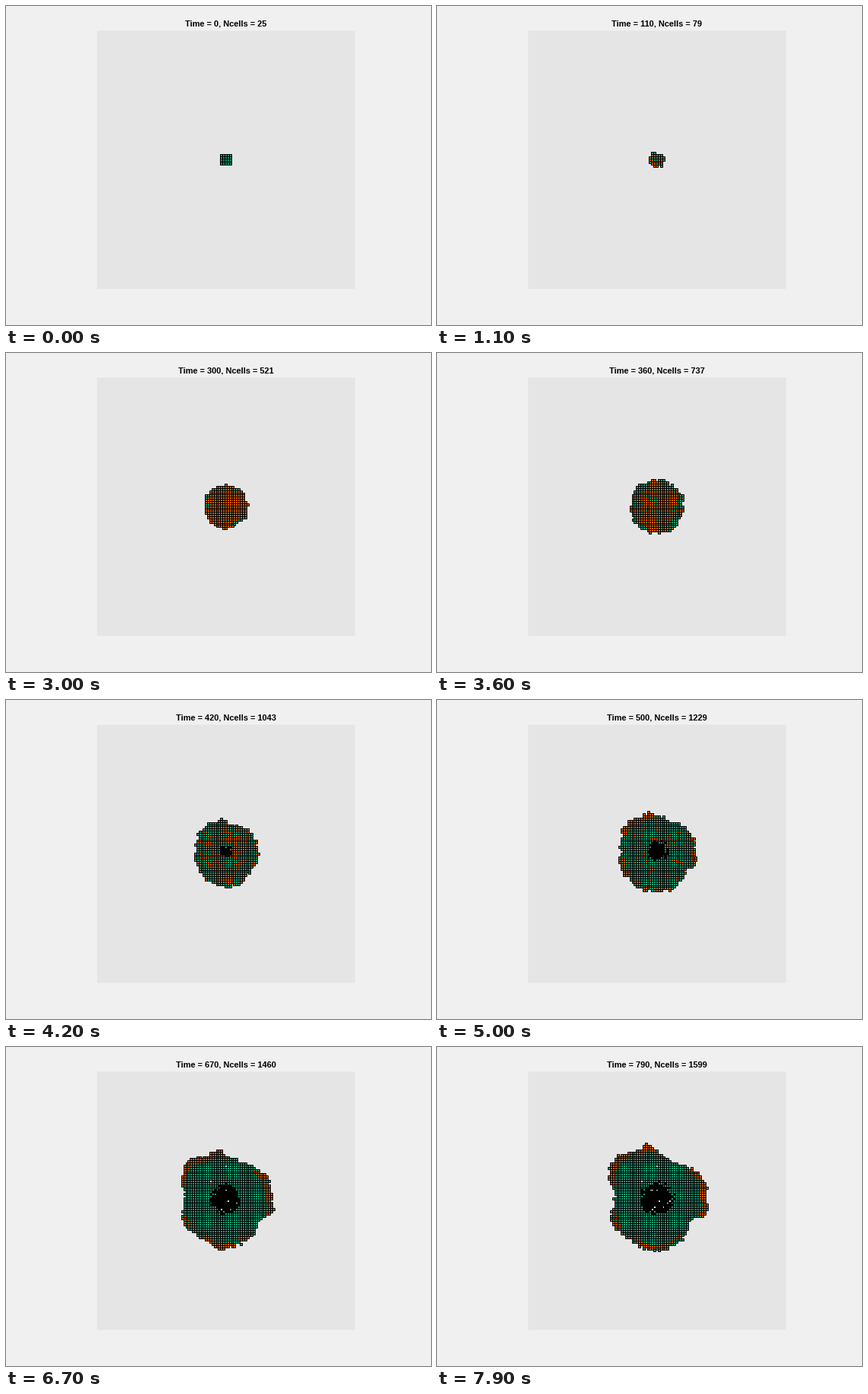
A matplotlib script that plays this animation: 560x420 px, repeating every 8 s.

```python
import numpy as np
import matplotlib.pyplot as plt
from matplotlib.animation import FuncAnimation
from matplotlib.patches import Rectangle

W, H, FRAMES = 560, 420, 80
PITCH, CX, CY = 340 / 119, 290, 202.75
GREEN, ORANGE, BLACK = (27, 158, 119, 255), (217, 95, 2, 255), (0, 0, 0, 255)

# Bulges and notches of the colony: direction and width in degrees, height in pixels
LOBES = [(135, 17, 17), (99, 6, 12), (70, 11, -6), (20, 14, 6), (-13, 8, 8),
         (-32, 10, -13), (-95, 15, 5), (-155, 11, 5), (175, 11, -6)]
COUNT = {0: 25, 220: 248, 300: 521, 420: 1043, 500: 1229, 670: 1460, 790: 1599}


def sigmoid(x):
    return 1 / (1 + np.exp(-x))


def clumpy(rng, weight):
    """Uniform field whose neighbouring values are alike."""
    n = rng.random(gx.shape)
    mix = n + weight * sum(np.roll(n, s, a) for a in (0, 1) for s in (-1, 1))
    return mix.ravel().argsort().argsort().reshape(n.shape) / n.size


gx, gy = np.meshgrid(np.arange(-32, 33), np.arange(-32, 33))
left = np.rint(CX + gx * PITCH - 2).astype(int)
top = np.rint(CY + gy * PITCH - 2).astype(int)
dist = PITCH * np.hypot(gx, gy)
core_dist = PITCH * np.hypot(gx, gy + 1)
angle = np.degrees(np.arctan2(-gy, gx))
seed_block = np.maximum(abs(gx), abs(gy)) <= 2

bulge = sum(h * np.exp(-(((angle - a + 180) % 360 - 180) / w) ** 2 / 2)
            for a, w, h in LOBES)

rng = np.random.default_rng(4)
rough = 4.4 * (clumpy(rng, 0.3) - 0.5)
ragged = rng.uniform(-1, 1, gx.shape)
phase, edge_phase = clumpy(rng, 0.5), clumpy(rng, 0.8)
vacancy = rng.random(gx.shape)


def colony(t):
    """Masks of living sites, dividing cells and the dead core."""
    base = 64 * sigmoid((t - 327) * 0.0075)
    edge = base + bulge * np.clip((t - 300) / 490, 0, 1)
    depth = edge - dist

    core = 22 * (1 - np.exp(-(t - 360) / 160))
    dead = core_dist + ragged * min(4, max(core, 0) * 0.4) < core
    empty = vacancy < np.where(dead, 0.055, 0.003) * np.clip((t - 600) / 190, 0, 1)
    alive = (seed_block | (depth >= rough + 1.2)) & ~empty

    share = np.clip((t - 30) / 120, 0, 1) * sigmoid((430 - t) / 45)
    rim = depth < np.clip(edge * 0.32, 4, 6 + max(0, t - 300) * 0.07)
    dividing = np.where(rim, edge_phase < 0.63 * share, phase < share)
    if t > 440:
        tip = (depth < 9) & (edge + 6 * (phase - 0.5) > base + 1)
        dividing |= tip & (edge_phase < 0.85)
    return alive, dividing, dead


def render(t):
    img = np.zeros((H, W, 4), np.uint8)
    alive, dividing, dead = colony(t)
    for j, i in np.argwhere(alive):
        x, y = left[j, i], top[j, i]
        img[y:y + 4, x:x + 4] = BLACK
        if not dead[j, i]:
            img[y + 1:y + 3, x + 1:x + 3] = ORANGE if dividing[j, i] else GREEN
    return img


fig = plt.figure(figsize=(5.6, 4.2), dpi=100, facecolor="#f0f0f0")
ax = fig.add_axes([0, 0, 1, 1])
ax.axis("off")
view = ax.imshow(render(0), extent=(0, W, H, 0), interpolation="nearest",
                 aspect="auto", zorder=2)
ax.add_patch(Rectangle((120, 32.5), 340, 340, fc="#e5e5e5", lw=0, snap=False))
ax.set(xlim=(0, W), ylim=(H, 0))
title = ax.text(CX, 26, "", ha="center", va="baseline", color="black",
                family="Liberation Sans", weight="bold", size=11 * 0.72)


def update(frame):
    t = frame * 10
    logs = np.interp(t, list(COUNT), np.log(list(COUNT.values())))
    view.set_data(render(t))
    title.set_text(f"Time = {t}, Ncells = {round(float(np.exp(logs)))}")
    return view, title


anim = FuncAnimation(fig, update, frames=FRAMES, interval=100,
                     repeat=True, repeat_delay=0)
plt.show()
```
